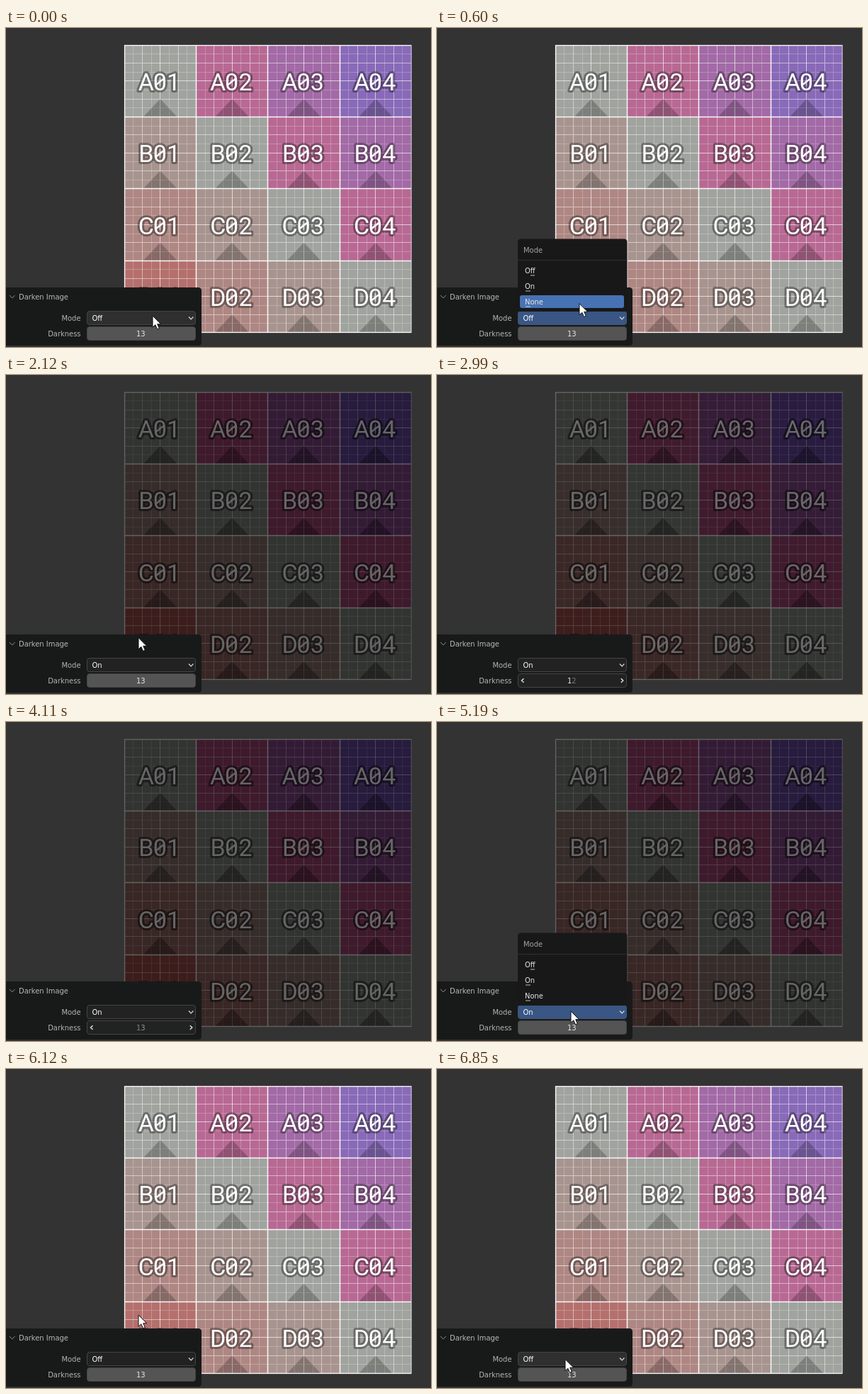
Animation of 600x450 px, one loop 6910 ms. Source, as an HTML page:

```html
<!DOCTYPE html>
<html lang="en">
<head>
<meta charset="utf-8">
<title>Darken Image</title>
<style>
html, body { margin: 0; width: 100%; height: 100%; overflow: hidden; background: #333; }
svg { display: block; width: 100vw; height: 100vh; }
.ui { font: 9.95px "DejaVu Sans", "Open Sans", sans-serif; }
.tile { font: 400 34px Roboto, "Liberation Sans", sans-serif; text-anchor: middle; }
</style>
</head>
<body>
<svg id="stage" viewBox="0 0 600 450">
  <filter id="darken" filterUnits="userSpaceOnUse" x="160" y="18" width="420" height="420" color-interpolation-filters="sRGB">
    <feComponentTransfer>
      <feFuncR type="gamma" exponent="1.5"/>
      <feFuncG type="gamma" exponent="1.5"/>
      <feFuncB type="gamma" exponent="1.5"/>
    </feComponentTransfer>
  </filter>
  <clipPath id="frame"><rect x="166.500" y="23.500" width="406" height="407"/></clipPath>
  <rect width="600" height="450" fill="#333"/>
  <g id="image" clip-path="url(#frame)"></g>
  <g class="ui">
    <path d="M0 366H271.500Q276 366 276 370.500V444Q276 448 271.500 448H0Z" fill="#181a1a"/>
    <path d="M5 377l3.800 4 3.800-4" fill="none" stroke="#8c8c8c"/>
    <text x="18" y="383" fill="#b8b8b8">Darken Image</text>
    <text x="105.500" y="413" text-anchor="end" fill="#b4b4b4">Mode</text>
    <text x="105.500" y="435" text-anchor="end" fill="#b4b4b4">Darkness</text>
    <rect id="modeBox" x="114.500" y="399.500" width="153" height="19" rx="3.500"/>
    <text id="modeText" x="121.500" y="413" fill="#fff"></text>
    <path d="M258 407.500l3.200 3.300 3.200-3.300" fill="none" stroke="#dedede" stroke-width="1.200"/>
    <rect id="numBox" x="114.500" y="421.500" width="153" height="19" rx="3.500"/>
    <path id="arrows" d="M122.500 428.200l-3 2.800 3 2.800M259.800 428.200l3 2.800-3 2.800" fill="none" stroke="#e8e8e8" stroke-width="1.400"/>
    <text x="190.300" y="435" text-anchor="middle"><tspan id="digitA"></tspan><tspan id="digitB"></tspan></text>
    <g id="menu">
      <path d="M114 400V302Q114 297.500 118.500 297.500H264Q268.500 297.500 268.500 302V400Z" fill="#181818"/>
      <text x="122" y="317" fill="#a5a5a5">Mode</text>
      <path d="M114 327.500H268.500" stroke="#303030"/>
      <rect id="highlight" x="117" width="147" height="18" rx="3" fill="#4772b3"/>
      <g id="items" fill="#e6e6e6"></g>
    </g>
  </g>
  <path id="cursor" d="M0 0V16.200L3.800 12.700 6.500 18.800 9.300 17.500 6.700 11.700H11.700Z" fill="#fff" stroke="#111" stroke-width="1"/>
</svg>
<script>
const LOOP = 6910, STEP = 66.45;
const $ = id => document.getElementById(id);

function add(parent, tag, attrs, text) {
  const el = document.createElementNS("http://www.w3.org/2000/svg", tag);
  for (const k in attrs) el.setAttribute(k, attrs[k]);
  if (text) el.textContent = text;
  parent.appendChild(el);
  return el;
}

function buildImage() {
  const x0 = 167, y0 = 24, cell = 101.4, size = cell * 4, img = $("image");
  // One colour per diagonal, from lower left to upper right
  const hues = ["#b4706d", "#ae8783", "#a8948f", "#a0a39e", "#b86993", "#a26aa6", "#886ab8"];
  const each = fn => { for (let r = 0; r < 4; r++) for (let c = 0; c < 4; c++) fn(r, c, x0 + c * cell, y0 + r * cell); };

  each((r, c, x, y) => add(img, "rect", { x, y, width: cell, height: cell, fill: hues[c - r + 3] }));
  const grid = (keep, width, opacity) => {
    let d = "";
    for (let i = 0; i <= 32; i++) {
      if (!keep(i % 8)) continue;
      // Centre each line on a whole pixel
      const p = Math.floor(i * cell / 8) + 0.5;
      d += `M${x0 + p} ${y0}v${size}M${x0} ${y0 + p}h${size}`;
    }
    add(img, "path", { d, stroke: "#fff", "stroke-width": width, opacity });
  };
  grid(i => i % 2, 1, 0.24);
  grid(i => i === 2 || i === 6, 1, 0.5);
  grid(i => i === 4, 1, 0.65);
  each((r, c, x, y) => add(img, "path", {
    d: `M${x + cell / 2} ${y + 76}l24 ${cell - 76}h-48Z`, fill: "#000", opacity: 0.22
  }));
  grid(i => i === 0, 1.5, 0.95);

  // Labels on a fixed pitch, with a slashed zero
  const pitch = 19.4;
  each((r, c, x, y) => {
    const cx = x + cell / 2 - 0.5, base = y + 63.9;
    const name = "ABCD"[r] + "0" + (c + 1);
    const at = { class: "tile", x: [cx - pitch, cx, cx + pitch].join(" "), y: base };
    add(img, "text", { ...at, fill: "#000", stroke: "#000", "stroke-width": 6, "stroke-linejoin": "round", opacity: 0.34 }, name);
    add(img, "text", { ...at, fill: "#fff" }, name);
    add(img, "path", { d: `M${cx - 5} ${base - 8}l10-8`, stroke: "#fff", "stroke-width": 2.4 });
  });
}

function buildMenu() {
  [["Off", 132, 6], ["On", 125, 7], ["None", 125, 7]].forEach(([name, ux, w], i) => {
    const y = 346 + i * 22;
    add($("items"), "text", { x: 124, y }, name);
    add($("items"), "rect", { x: ux, y: y + 2.5, width: w, height: 1, opacity: 0.8 });
  });
}

// Pointer tip: step, x, y
const path = [
  [0, 207, 406], [7, 207, 406], [13, 189, 354], [14, 189, 354], [16, 187, 358],
  [31, 187, 358], [36, 187, 421], [64, 187, 427], [65, 188, 427], [68, 189, 408],
  [78, 189, 408], [85, 178, 337], [88, 178, 337], [90, 187, 347],
  [96, 187, 347], [103, 181, 409.5]
];
// Start time, value
const values = [
  [0, 13], [2990, 12], [3050, 11], [3115, 10], [3180, 9], [3320, 8],
  [3650, 9], [3715, 10], [3780, 11], [3910, 12], [4110, 13]
];

const within = (t, a, b) => t >= a && t < b;

function pointer(t) {
  const n = Math.min(103, Math.floor((t + 12) / STEP));
  const i = path.findIndex(k => k[0] >= n);
  if (i < 1) return path[0].slice(1);
  const [a, ax, ay] = path[i - 1], [b, bx, by] = path[i];
  const u = (n - a) / (b - a);
  return [ax + (bx - ax) * u, ay + (by - ay) * u];
}

function paintBox(id, fill, stroke) {
  $(id).setAttribute("fill", fill);
  $(id).setAttribute("stroke", stroke);
}

function render(t) {
  const [x, y] = pointer(t);
  const on = within(t, 1460, 6120);
  const pressed = within(t, 70, 1460) || within(t, 4710, 6120);
  const open = within(t, 140, 1460) || within(t, 4780, 6120);
  const drag = within(t, 2660, 4310);
  const value = values.filter(v => v[0] <= t).pop()[1];

  const amplitude = 0.4 + 0.015 * (13 - value);
  for (const f of document.querySelectorAll("feComponentTransfer > *")) f.setAttribute("amplitude", amplitude);
  if (on) $("image").setAttribute("filter", "url(#darken)");
  else $("image").removeAttribute("filter");

  const overMode = y >= 399 && y < 420;
  const overNum = !pressed && y >= 420.5;
  if (pressed) paintBox("modeBox", "#395684", "#42567a");
  else paintBox("modeBox", overMode ? "#2f2f2f" : "#222", "#444");
  $("modeText").textContent = on ? "On" : "Off";

  if (drag) paintBox("numBox", "#222", "#444");
  else paintBox("numBox", overNum ? "#656565" : "#545454", "#444");
  $("arrows").style.display = drag || overNum ? "" : "none";

  const digits = String(value);
  const dim = drag && t >= 2990;
  $("digitA").textContent = digits[0];
  $("digitB").textContent = digits[1] || "";
  $("digitA").setAttribute("fill", dim && t >= 3050 ? "#858585" : "#e6e6e6");
  $("digitB").setAttribute("fill", dim ? (t < 3050 ? "#777" : "#959595") : "#e6e6e6");

  $("menu").style.display = open ? "" : "none";
  const row = Math.floor((y - 332) / 22);
  $("highlight").style.display = row >= 0 && row < 3 ? "" : "none";
  $("highlight").setAttribute("y", 333 + row * 22);

  $("cursor").style.display = drag ? "none" : "";
  $("cursor").setAttribute("transform", `translate(${x} ${y})`);
}

buildImage();
buildMenu();
const start = performance.now();
function tick() {
  render((performance.now() - start) % LOOP);
  requestAnimationFrame(tick);
}
tick();
</script>
</body>
</html>
```
